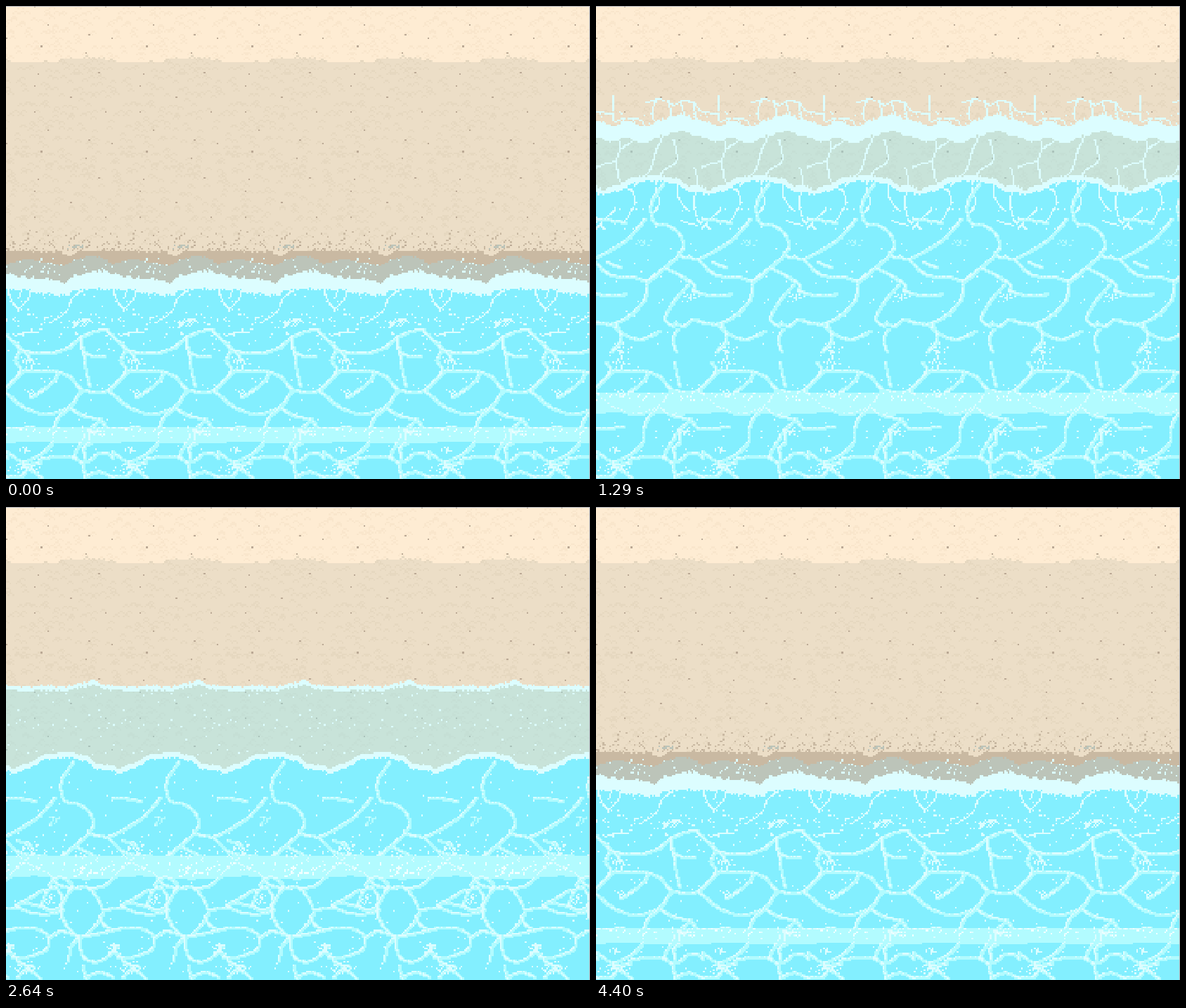
Write an HTML page with a canvas that moves like this. It is 831 by 674 pixels and loops after 4500 ms.

```html
<!DOCTYPE html>
<html lang="en">
<head>
<meta charset="utf-8">
<title>Pixel beach</title>
<style>
  html, body { margin: 0; width: 100%; height: 100%; overflow: hidden; background: #83efff; }
  canvas { display: block; width: 831px; height: 674px; image-rendering: pixelated; }
</style>
</head>
<body>
<canvas id="stage" width="831" height="674"></canvas>
<script>
const LOOP = 4500, PERIOD = 150, COLS = 64, ROWS = 288, SPLIT = 216;
const CELL = PERIOD / COLS;
const WATER = '#83efff', MID = '#b2fbff', LIGHT = '#dcfdff', WHITE = '#f0ffff';
const TEAL = '#70cfdd', BLUE = '#62bfe0', BROWN = '#c9b9a2', GREY = '#bcc4b9';
const WASH = 'rgba(148,234,244,.4)', THIN = 'rgba(148,234,244,.25)';

const points = s => s.trim().split(/\s+/).map(p => p.split(',').map(Number));

function random(seed) {
  return () => {
    seed = (seed + 0x6d2b79f5) | 0;
    let r = Math.imul(seed ^ (seed >>> 15), 1 | seed);
    r = (r + Math.imul(r ^ (r >>> 7), 61 | r)) ^ r;
    return ((r ^ (r >>> 14)) >>> 0) / 4294967296;
  };
}

// Periodic shoreline through the given points; the first one has x = 0.
function edge(s) {
  const p = points(s);
  return x => {
    let i = p.findIndex(q => q[0] > x);
    if (i < 0) i = p.length;
    const a = p[i - 1], b = p[i] || [PERIOD, p[0][1]];
    const t = (x - a[0]) / (b[0] - a[0]);
    return a[1] + (b[1] - a[1]) * t * t * (3 - 2 * t);
  };
}
const level = y => () => y;
const shift = (f, d) => x => f(x) + d;

// One horizontally repeating strip; drawing outside rows r0..r1 is clipped.
function tile(r0, r1, seed, draw) {
  const el = document.createElement('canvas');
  el.width = COLS;
  el.height = ROWS;
  const g = el.getContext('2d'), rnd = random(seed);

  const cell = (c, r, color, h = 1) => {
    const top = Math.max(r, r0), end = Math.min(r + h, r1);
    if (end <= top) return;
    g.fillStyle = color;
    g.fillRect(((c % COLS) + COLS) % COLS, top, 1, end - top);
  };
  const dot = (x, y, color) => cell(Math.floor(x / CELL), Math.floor(y / CELL), color);

  function band(top, end, color, rough = 0) {
    for (let c = 0; c < COLS; c++) {
      const x = (c + .5) * CELL;
      const a = Math.round((top(x) - rnd() * rough) / CELL);
      const b = Math.round((end(x) + rnd() * rough) / CELL);
      cell(c, a, color, b - a);
    }
  }

  function stroke(path, color, width = 1, density = 1, dy = 0) {
    const p = points(path);
    for (let i = 0; i < p.length - 1; i++) {
      const a = p[Math.max(i - 1, 0)], b = p[i], c = p[i + 1], d = p[Math.min(i + 2, p.length - 1)];
      const n = Math.ceil(Math.hypot(c[0] - b[0], c[1] - b[1]) / 1.6);
      for (let k = 0; k <= n; k++) {
        if (rnd() > density) continue;
        const t = k / n;
        const [x, y] = [0, 1].map(j => .5 * (2 * b[j] + (c[j] - a[j]) * t +
          (2 * a[j] - 5 * b[j] + 4 * c[j] - d[j]) * t * t +
          (3 * b[j] - a[j] - 3 * c[j] + d[j]) * t * t * t));
        for (let u = 0; u < width; u++)
          for (let v = 0; v < width; v++) dot(x + u * CELL, y + dy + v * CELL, color);
      }
    }
  }

  function net(paths, core = .6, dy = 0) {
    const list = paths.split('/');
    list.forEach(s => stroke(s, MID, 2, 1, dy));
    list.forEach(s => stroke(s, LIGHT, 1, core, dy));
  }
  const lines = (paths, dy = 0) => paths.split('/').forEach(s => stroke(s, LIGHT, 1, .95, dy));

  // Loose pixels, denser toward y1.
  function specks(n, y0, y1, color, bias = 1) {
    while (n--) dot(rnd() * PERIOD, y0 + (y1 - y0) * Math.pow(rnd(), bias), color);
  }
  function splash(x, y, w, h, n, color) {
    while (n--) dot(x + (rnd() + rnd() - 1) * w, y + (rnd() + rnd() - 1) * h, color);
  }

  draw({ cell, dot, band, stroke, net, lines, specks, splash, rnd });
  return el;
}

const dryEdge = edge('0,78 22,80 72,79 80,76 105,74 135,75');
const pebbles = points('41,2 141,2 59,26 118,40 1,45 51,58 113,67 45,97 132,95 40,113 92,129');

const sand = tile(0, ROWS, 5, p => {
  p.band(level(0), level(674), '#ecdec7');
  p.band(level(0), dryEdge, '#feecd3');
  const tone = (x, y) => y < dryEdge(((x % PERIOD) + PERIOD) % PERIOD) - 2 ? '#f9e6cc' : '#e6d8c0';
  for (let i = 0; i < 520; i++) {
    const x = p.rnd() * PERIOD, y = p.rnd() * 420;
    for (let k = 0; k < 4; k++) {
      const u = x + k * CELL, v = y + (k % 3 ? 0 : CELL);
      p.dot(u, v, tone(u, v));
    }
  }
  for (const [x, y] of pebbles)
    for (let k = 0; k < 3; k++) p.dot(x, y + k * PERIOD, '#bba995');
});

// Light nets in the deeper water.
const rings = `30,518 55,519 75,521 92,529 106,545 125,549 145,547 163,530 178,516
  /75,522 62,538 35,557 /-5,547 15,564 35,576 60,580 88,571 106,548
  /12,505 20,519 8,535 -5,547 /112,500 113,520 118,540
  /90,572 72,588 67,605 65,622 48,638 22,650 /90,572 112,584 133,588 145,601 168,601 188,598
  /135,588 117,604 106,622 97,640 108,650 /118,603 118,620 110,630 112,645
  /0,635 20,648 30,654 /45,645 80,640 97,643 /108,650 120,645 130,637 145,637 152,643
  /0,669 22,668 35,652 48,650 /25,654 40,664 50,672 /108,652 112,672 /115,668 132,663 150,670`;
const hexes = `92,543 84,556 78,574 84,593 105,612 128,593 136,573 118,543 92,543
  /92,543 72,536 60,522 40,512 24,505 /118,543 140,538 160,520 176,505
  /60,538 70,528 85,529 95,542 /50,566 56,548 68,541 78,553 76,568 62,574 50,566
  /13,567 35,555 52,544 /13,567 35,577 60,579 80,574 /20,561 50,568
  /136,573 165,570 /133,583 140,596 155,602 /105,612 140,605 165,599
  /0,602 30,598 50,603 60,614 55,630 30,640 8,640 /60,614 78,604 105,612
  /105,612 92,624 88,646 /105,612 106,633 115,645 133,646 150,634 158,624
  /0,632 12,640 22,650 38,654 /108,652 113,672 /15,670 30,658 48,671 /115,668 132,662 150,668`;

const bands = [
  [600, 623], [584, 610], [568, 597], [551, 581], [533, 565],
  [527, 545], [506, 529], [506, 516, 645, 667], [629, 655], [613, 641]
];

const deep = bands.map((b, i) => tile(SPLIT, ROWS, 21, p => {
  p.band(level(500), level(676), WATER);
  for (let k = 0; k < b.length; k += 2)
    p.band(level(b[k]), edge(`0,${b[k + 1]} 40,${b[k + 1] - 3} 75,${b[k + 1]} 115,${b[k + 1] + 2}`), MID);
  p.net(i < 5 ? rings : hexes, i < 5 ? .45 : .6);
  if (i < 5) {
    p.splash(28, 632, 10, 6, 14, LIGHT);
    p.splash(125, 608, 16, 8, 24, LIGHT);
    p.splash(35, 510, 14, 8, 20, LIGHT);
    p.splash(40, 550, 20, 5, 14, LIGHT);
  } else {
    p.splash(5, 628, 9, 8, 18, LIGHT);
    p.splash(152, 630, 10, 8, 14, LIGHT);
    p.splash(62, 560, 12, 12, 18, LIGHT);
    p.splash(115, 520, 30, 8, 24, WHITE);
  }
  p.splash(30, 657, 22, 9, 34, LIGHT);
  p.specks(34, 515, 672, LIGHT);
  for (let k = 0; k < b.length; k += 2) p.specks(26, b[k], b[k] + 12, WHITE);
}));

// Incoming wave: ragged front, foam, dark lip and streaks behind it.
function surge(p, dy) {
  const front = edge('0,267 18,274 33,283 50,275 68,288 88,280 104,271 117,283 130,267 143,264');
  const lip = edge('0,303 20,310 58,316 78,314 105,306 120,302 137,303');
  const top = shift(front, dy), back = shift(lip, dy);
  p.band(back, level(506), WATER);
  p.band(shift(top, -7), top, BROWN, 6);
  p.specks(40, 244 + dy, 272 + dy, BROWN, .6);
  p.band(top, back, LIGHT, 2);
  p.specks(28, 248 + dy, 276 + dy, LIGHT, .7);
  p.specks(14, 272 + dy, 284 + dy, BROWN);
  for (let c = 0; c < COLS; c++)
    if (p.rnd() < .72) p.cell(c, Math.round(back((c + .5) * CELL) / CELL), BLUE, 2);
  p.lines(`28,318 16,338 3,372 /65,318 52,342 55,372 /78,318 88,348 108,382
    /100,314 114,342 110,382 /114,308 136,350 164,386 /122,308 146,352 166,386
    /132,308 136,330 148,356 /142,308 158,338 152,362 /50,318 54,335 46,365
    /15,388 30,393 52,397 75,395 110,385 138,385 165,387 /108,388 104,402 112,414`, dy);
  p.stroke('40,316 36,345 18,384', LIGHT, 2, 1, dy);
  p.net(`0,428 10,436 28,440 42,431 56,442 66,456 60,476 32,494 20,507
    /107,463 108,490 114,507 /92,436 105,450 112,465 /108,462 122,459 136,472 152,470 168,462 178,450
    /10,476 8,492 22,504`, .75, dy);
  p.splash(108, 410 + dy, 9, 12, 20, LIGHT);
  p.splash(20, 385 + dy, 20, 8, 24, LIGHT);
  p.splash(35, 500, 16, 12, 24, LIGHT);
  p.specks(65, 395 + dy, 500, LIGHT);
}

// Wide cells trailing behind the backwash.
function cells(p, dy) {
  p.net(`95,270 78,298 82,325 104,331 120,346 122,363 116,372 145,378
    /-5,378 25,362 47,347 68,322 /-5,378 10,394 26,402 52,404 75,408 97,390 117,373
    /97,390 120,402 138,414 140,424 167,430 190,428 /97,390 73,410 68,436 42,462 15,472
    /130,415 108,440 98,463 110,474 /112,470 125,473 135,465 150,467
    /0,468 22,472 40,486 65,492 90,480 /30,472 34,495 22,508 /115,478 108,494 114,510
    /150,322 165,322 190,326 /15,382 35,390`, .5, dy);
  p.splash(67, 355 + dy, 13, 8, 16, MID);
  p.splash(130, 432 + dy, 14, 8, 20, LIGHT);
  p.splash(35, 490, 14, 16, 28, LIGHT);
  p.specks(44, 285 + dy, 500, LIGHT);
}

// Thin sheet of water between a foam front and the water's edge.
function backwash(p, top, rear, tint, foam) {
  p.band(top, rear, tint);
  if (foam) p.band(top, shift(top, foam), LIGHT, 3);
  p.band(rear, level(506), WATER);
  p.band(shift(rear, -2), shift(rear, 4), LIGHT, 2);
}
const swell = (y, h) => edge(`0,${y + h * .8} 10,${y + h} 30,${y + h * .7} 58,${y + h * .1} 88,${y} 112,${y + h * .2} 132,${y + h * .75}`);

const streaks = `25,88 25,124 40,120 62,122 68,132 55,150 34,166 30,188 36,212 52,223
  /34,166 36,142 52,124 /72,98 90,93 110,101 /103,95 106,115 98,140 86,165 76,195 54,216
  /85,95 80,116 92,134 /112,101 126,95 140,99 150,110 172,113 /120,95 125,120 114,140
  /140,100 142,130 /110,150 115,180 96,195 86,215 90,240 80,258
  /140,190 145,214 139,240 146,268 /115,215 118,235 132,252 /52,223 55,242 40,268
  /0,190 15,184 30,182 /120,266 145,272 152,262 /150,278 165,262 178,250 /5,270 12,278`;

const shore = [
  p => {
    const gap = edge('0,368 30,362 55,366 82,371 100,362 122,357 140,360');
    const foam = edge('0,383 22,388 55,390 82,397 100,385 122,381 140,380');
    const rear = edge('0,402 30,403 55,407 82,411 105,403 130,401');
    p.specks(80, 319, 350, BROWN, .5);
    p.band(edge('0,350 75,351 90,357 103,350'), foam, BROWN, 2);
    p.band(gap, shift(foam, 3), GREY, 2);
    p.specks(34, 358, 384, LIGHT, .6);
    p.splash(100, 343, 14, 3, 14, GREY);
    p.band(rear, level(506), WATER);
    p.band(foam, rear, LIGHT, 4);
    p.lines(`3,404 8,420 18,432 /36,404 30,420 18,432 /22,404 18,416
      /108,406 95,416 85,436 62,452 /95,458 112,446 122,450 /12,470 30,465 45,466`);
    p.net(`-7,462 10,478 22,489 38,493 60,494 88,486 105,472 125,463 143,460
      /106,474 109,490 120,497 140,499 /109,490 112,508 /24,490 36,505 /20,488 10,508`);
    p.splash(108, 450, 12, 8, 22, LIGHT);
    p.splash(33, 506, 14, 8, 24, LIGHT);
    p.specks(70, 410, 472, LIGHT);
    p.specks(14, 472, 500, LIGHT);
  },
  p => surge(p, 52),
  p => surge(p, 0),
  p => {
    const top = edge('0,165 20,172 45,166 70,173 95,163 120,156 140,162');
    p.specks(24, 152, 170, LIGHT);
    backwash(p, top, swell(244, 20), WASH, 20);
    p.lines(streaks, 40);
    cells(p, -18);
  },
  p => {
    p.band(dryEdge, level(90), '#ecdec0');
    const top = edge('0,86 15,88 28,84 55,86 70,87 90,82 112,81 132,80 145,85');
    backwash(p, top, swell(261, 23), WASH, 8);
    p.lines(streaks);
    p.stroke('25,88 25,122', LIGHT, 2);
    p.stroke('60,122 68,132 55,150', LIGHT, 2);
    p.splash(112, 102, 24, 10, 40, LIGHT);
    p.specks(64, 150, 275, LIGHT);
    cells(p, 0);
  },
  p => {
    const top = edge('0,147 20,149 40,146 65,149 84,147 103,144 125,139 140,146');
    backwash(p, top, swell(316, 27), WASH, 8);
    p.lines(`135,160 141,172 136,190 /108,180 114,200 110,216 /85,200 90,215 86,225
      /36,222 52,205 58,200 /120,160 130,164 128,174 /22,190 20,210 /62,222 72,236
      /106,236 108,250 /24,256 32,268 36,278 /72,284 84,272 90,262 /5,200 8,214`);
    p.specks(68, 160, 315, LIGHT);
    p.net(`60,340 72,350 74,367 60,382 40,387 18,389 -8,397 /94,320 100,340 88,362 74,378
      /118,340 125,350 150,347 175,340 /110,348 118,366 120,395
      /125,402 140,387 160,382 185,388 /122,398 117,420 122,434 145,437 178,418 197,405
      /-5,437 10,453 26,461 52,463 75,467 97,449 117,432 /97,449 120,462 140,474 142,486
      /97,449 76,476 88,494 70,507 /112,486 125,480 142,483 160,494 155,507 /112,486 110,506 /0,486 10,500`, .55);
    p.splash(67, 413, 12, 7, 16, MID);
    p.splash(130, 348, 20, 6, 18, LIGHT);
    p.splash(135, 490, 18, 10, 26, LIGHT);
    p.specks(44, 350, 500, LIGHT);
  },
  p => {
    const top = edge('0,256 25,258 50,256 82,258 105,253 125,249 142,255');
    backwash(p, top, swell(352, 23), WASH, 3);
    p.specks(34, 265, 355, LIGHT);
    cells(p, 92);
    p.band(level(497), level(506), MID);
    p.specks(35, 484, 505, LIGHT);
  },
  p => {
    const crest = edge('0,492 20,490 45,489 72,493 95,486 120,480 140,482');
    backwash(p, edge('0,293 25,294 55,291 82,294 104,290 122,286 142,291'), swell(380, 16), THIN, 0);
    p.band(shift(swell(380, 16), -1), shift(swell(380, 16), 7), LIGHT);
    p.lines('52,395 66,398 72,410 /80,398 82,412 /115,402 126,414 /122,405 140,412 165,410 /30,400 48,392');
    p.specks(60, 398, 436, LIGHT, 1.2);
    p.specks(66, 436, 478, LIGHT, .8);
    p.band(shift(crest, -9), crest, TEAL, 4);
    p.specks(30, 458, 488, TEAL);
    p.splash(12, 468, 18, 16, 36, LIGHT);
    p.splash(15, 475, 14, 6, 9, GREY);
    p.band(shift(crest, 3), level(506), MID);
    p.band(crest, shift(crest, 9), WHITE, 3);
    p.lines('110,488 112,502 125,508 /150,494 142,506 /24,497 26,507');
    p.splash(30, 503, 28, 7, 30, WHITE);
    p.specks(22, 494, 506, LIGHT);
  },
  p => {
    const lens = edge('0,411 30,409 50,401 72,394 90,393 112,398 136,408');
    const foam = edge('0,440 30,442 58,443 78,440 100,433 125,431 140,435');
    const rear = edge('0,449 30,451 58,454 78,451 105,445 130,444');
    p.band(edge('0,351 25,356 66,358 82,354 102,345 122,342 142,347'), level(440), THIN);
    p.splash(15, 399, 15, 14, 36, GREY);
    p.band(level(409), foam, 'rgba(150,190,192,.65)');
    p.band(shift(lens, 5), edge('0,411 45,412 90,416 130,412'), WATER);
    p.band(lens, shift(lens, 5), LIGHT, 2);
    p.band(edge('0,423 25,420 45,415 90,413 112,418 140,423'), foam, TEAL, 2);
    p.specks(28, 415, 440, GREY);
    p.specks(34, 404, 436, LIGHT);
    p.stroke('108,420 125,417 145,426', MID, 1, .8);
    p.band(rear, level(506), WATER);
    p.band(foam, rear, LIGHT, 3);
    p.lines(`3,452 7,466 /16,452 20,464 32,460 32,450 /95,452 92,462 80,474 62,478
      /105,484 116,493 110,506 /120,450 128,460 /150,465 170,470 180,466`);
    p.stroke('124,474 138,470 152,466', MID, 4);
    p.net('15,493 24,490 30,505 /20,495 5,508 /25,507 40,512 /165,505 176,490');
    p.splash(22, 498, 14, 12, 32, LIGHT);
    p.splash(112, 492, 8, 12, 16, LIGHT);
    p.specks(60, 452, 505, LIGHT);
  }
].map((draw, i) => tile(0, SPLIT, 40 + i, draw));

const shoreTimes = [90, 610, 1040, 1570, 2050, 2520, 3020, 3500, 4040];
const deepTimes = [450, 860, 1290, 1750, 2200, 2640, 3080, 3500, 3940, 4400];
const step = (times, t) => times.filter(v => v <= t).length % times.length;

const ctx = document.getElementById('stage').getContext('2d');
let shown = '';

function render(now) {
  const t = now % LOOP, s = step(shoreTimes, t), d = step(deepTimes, t);
  const key = s + ':' + d;
  if (key !== shown) {
    shown = key;
    ctx.imageSmoothingEnabled = false;
    for (let x = 0; x < 831; x += PERIOD)
      for (const img of [sand, shore[s], deep[d]])
        ctx.drawImage(img, x, 0, PERIOD, ROWS * CELL);
    ctx.fillStyle = '#aeb0b8';
    ctx.fillRect(0, 0, 831, 1);
    ctx.fillRect(830, 0, 1, 674);
  }
  requestAnimationFrame(() => render(performance.now()));
}
render(performance.now());
</script>
</body>
</html>
```
